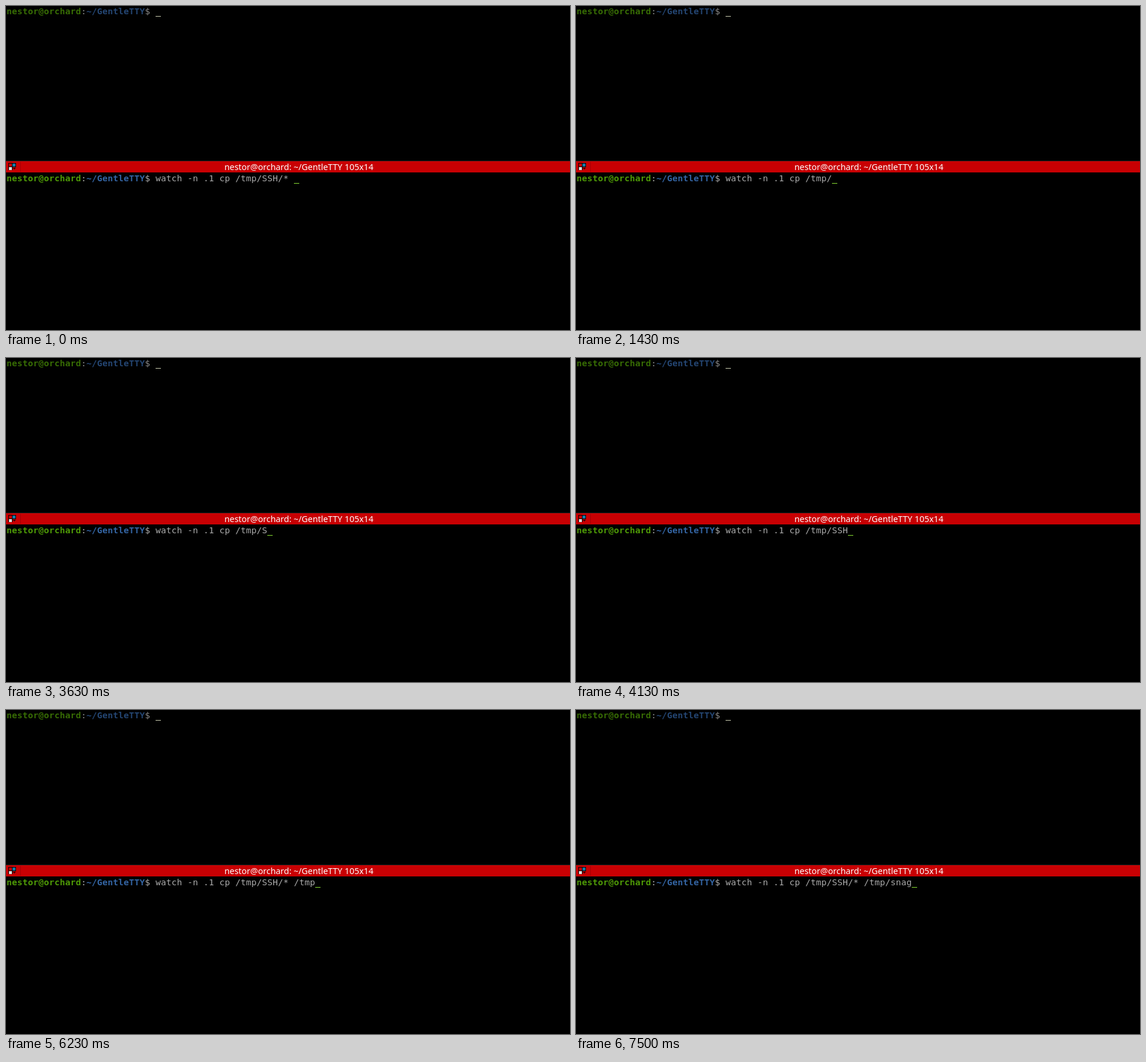
These frames come from a looping animation (954 by 549 pixels, 8000 ms). An HTML page:

```html
<!DOCTYPE html>
<html lang="en">
<head>
<meta charset="utf-8">
<title>Split terminal</title>
<style>
  html, body { margin: 0; width: 100%; height: 100%; overflow: hidden; background: #000; }
  .pane {
    position: absolute; left: 1px;
    font: 14.667px/18px "DejaVu Sans Mono", monospace;
    letter-spacing: calc(9px - 1ch);
    white-space: pre;
    color: var(--text);
  }
  .idle   { top: 0;     --text: #888; --user: #376c04; --path: #244673; --cursor: #cdd0b4; }
  .active { top: 283px; --text: #aaa; --user: #4e9a06; --path: #3465a4; --cursor: #8ae234; }
  .user { color: var(--user); }
  .path { color: var(--path); }
  .cursor {
    display: inline-block; vertical-align: top;
    width: 9px; height: 18px;
    box-shadow: inset 0 -1px var(--cursor);
  }
  .bar {
    position: absolute; top: 262px; left: 0; right: 0; height: 19px;
    border-top: 1px solid #222;
    background: #c80003; color: #fff;
    font: 14.4px/19px "Noto Sans", sans-serif;
  }
  .title { position: absolute; left: 37px; right: 0; text-align: center; white-space: pre; }
  .bar svg { position: absolute; left: 0; top: 0; }
</style>
</head>
<body>
<div class="pane idle"><b class="user">nestor@orchard</b>:<b class="path">~/GentleTTY</b>$ <span class="cursor"></span></div>
<div class="bar">
  <svg width="26" height="19">
    <path d="M4 3h13v7h-6v5H4z" fill="#000"/>
    <path d="M5 4h5v5H5z" fill="#c80003"/>
    <path d="M11 4h5v5h-5z" fill="#1679a8"/>
    <path d="M5 10h5v5H5z" fill="#ddd"/>
    <path d="M11 11h6l-3 3z" fill="#300"/>
    <path d="M24 1h1v17h-1z" fill="#a80003"/>
  </svg>
  <div class="title">nestor@orchard: ~/GentleTTY 105x14</div>
</div>
<div class="pane active"><b class="user">nestor@orchard</b>:<b class="path">~/GentleTTY</b>$ watch -n .1 cp /tmp/<span id="typed"></span><span class="cursor" id="cursor"></span></div>
<script>
  const LOOP = 8000;
  const TAIL = "SSH/* /tmp/snag";
  const ERASED = 6;
  // One time per key press; the last three letters arrive together.
  const KEYS = [3630, 3870, 4130, 4670, 5500, 5700, 5830, 6100, 6165, 6230, 6700, 7230, 7500, 7500, 7500];
  const CURSOR_OFF = [[830, 1430], [2000, 2600], [3230, 3500]];

  const typed = document.getElementById("typed");
  const cursor = document.getElementById("cursor");

  function typedLength(t) {
    if (t < 30) return ERASED;
    if (t < 300) return ERASED - 1 - Math.floor((t - 30) / 54);
    return KEYS.filter(time => time <= t).length;
  }

  function draw() {
    const t = performance.now() % LOOP;
    const hidden = CURSOR_OFF.some(([from, to]) => t >= from && t < to);
    typed.textContent = TAIL.slice(0, typedLength(t));
    cursor.style.visibility = hidden ? "hidden" : "visible";
    requestAnimationFrame(draw);
  }
  draw();
</script>
</body>
</html>
```
